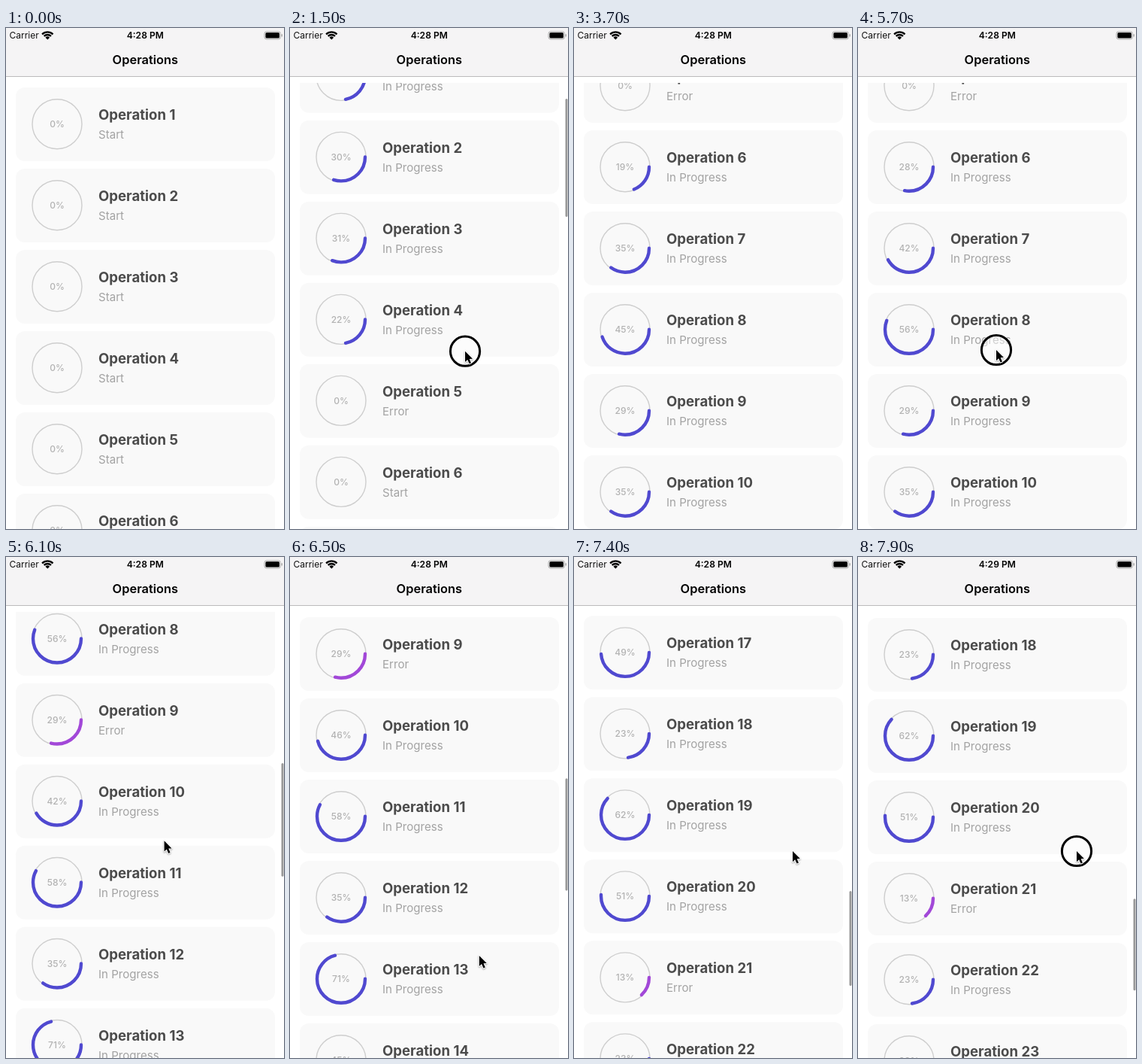
Recreate the animation shown at these times as an HTML page with a canvas. Size 370 by 666 pixels, loop 8 s.

```html
<!DOCTYPE html>
<html lang="en">
<head>
<meta charset="utf-8">
<title>Operations</title>
<style>
  html, body { margin: 0; width: 100%; height: 100%; overflow: hidden; background: #fff; }
  canvas { display: block; width: 370px; height: 666px; }
</style>
</head>
<body>
<canvas id="stage"></canvas>
<script>
const W = 370, H = 666, LOOP = 8000, STEP = 100;
const PITCH = 108, FIRST_TOP = 79, LIST_TOP = 73, VIEW = H - LIST_TOP;
const BLUE = '#5049d0', PURPLE = '#a248d8';
const TAU = Math.PI * 2, DECAY = 2.87;

const canvas = document.getElementById('stage');
const dpr = window.devicePixelRatio || 1;
canvas.width = W * dpr;
canvas.height = H * dpr;
const ctx = canvas.getContext('2d');
ctx.scale(dpr, dpr);

const ramp = (t, from, to) => Math.min(1, Math.max(0, (t - from) / (to - from)));
const mix = (a, b, u) => a + (b - a) * u;
const pull = u => u ** 1.6;
const coast = u => (1 - Math.exp(-DECAY * u)) / (1 - Math.exp(-DECAY));

// Each touch drags the list from (x, y) to (endX, y - drag), then coasts to a stop.
const flicks = [
  { down: 1300, up: 1600, rest: 2200, x: 232, endX: 234, y: 494, drag: 123, stop: 483 },
  { down: 5700, up: 5900, rest: 6500, x: 184, endX: 190, y: 428, drag: 127, stop: 863 },
  { down: 6550, up: 6800, rest: 7800, x: 257, endX: 291, y: 549, drag: 158, stop: 1834 },
  { down: 7800, up: LOOP, rest: LOOP, x: 291, endX: 291, y: 391, drag: 0, stop: 1834 }
];

function scrollAt(t) {
  let scroll = 0;
  for (const { down, up, rest, drag, stop } of flicks) {
    if (t < down) break;
    const released = scroll + drag;
    scroll = t < up
      ? mix(scroll, released, pull(ramp(t, down, up)))
      : mix(released, stop, coast(ramp(t, up, rest)));
  }
  return scroll;
}

const waypoints = [
  { t: 1000, x: 279, y: 519 },
  { t: 2500, x: 241, y: 372 },
  { t: 2700, x: 298, y: 375 },
  { t: 3300, x: 298, y: 375 },
  { t: 5200, x: 290, y: 520 },
  ...flicks.flatMap(f => [
    { t: f.down, x: f.x, y: f.y, ease: pull },
    { t: f.up, x: f.endX, y: f.y - f.drag }
  ])
].sort((a, b) => a.t - b.t);

function pointerAt(t) {
  if (t < 1000 || (t >= 3300 && t < 5200)) return null;
  const next = waypoints.findIndex(p => p.t > t);
  const a = waypoints[next - 1], b = waypoints[next];
  const linear = ramp(t, a.t, b.t), u = a.ease ? a.ease(linear) : linear;
  return { x: mix(a.x, b.x, u), y: mix(a.y, b.y, u) };
}

const goals = [
  22, 30, 31, 22, 0, 28, 42, 56, 29, 46, 58, 35,
  71, 45, 6, 55, 49, 23, 62, 51, 13, 23, 28
];
const lateGain = { 6: 9, 7: 7, 8: 11, 10: 11 };
const failing = [5, 9, 15, 21];

function stateOf(n, t) {
  const early = n <= 5, middle = n <= 8;
  const started = t >= (early ? 100 : 1700);
  const failed = failing.includes(n) && t >= (early ? 100 : 6000);
  const growth = early ? ramp(t, 400, 1300) : middle ? ramp(t, 1700, 2400) : ramp(t, 3100, 3700);
  const lateStart = middle ? 4100 : 5800;
  const pending = (lateGain[n] || 0) * (1 - ramp(t, lateStart, lateStart + 500));
  return {
    percent: (goals[n - 1] - pending) * growth,
    failed,
    label: failed ? 'Error' : started ? 'In Progress' : 'Start'
  };
}

function text(str, x, y, size, weight, color, align = 'left') {
  ctx.font = `${weight} ${size}px Inter, sans-serif`;
  ctx.fillStyle = color;
  ctx.textAlign = align;
  ctx.fillText(str, x, y);
}

function roundRect(x, y, w, h, r, color) {
  ctx.beginPath();
  ctx.roundRect(x, y, w, h, r);
  ctx.fillStyle = color;
  ctx.fill();
}

function arc(x, y, r, from, to, width, color) {
  ctx.beginPath();
  ctx.arc(x, y, r, from, to);
  ctx.lineWidth = width;
  ctx.strokeStyle = color;
  ctx.stroke();
}

function drawCard(n, top, t) {
  const { percent, failed, label } = stateOf(n, t);
  const cx = 68, cy = top + 48.7;
  roundRect(13, top, 345, 98, 12, '#f9f9f9');
  arc(cx, cy, 33, 0, TAU, 1.4, '#cecece');
  if (percent >= 0.5) {
    ctx.lineCap = 'round';
    arc(cx, cy, 32, 0, TAU * percent / 100, 4.4, failed ? PURPLE : BLUE);
  }
  text(Math.round(percent) + '%', cx, cy + 4.4, 12, 500, '#b2b2b2', 'center');
  text('Operation ' + n, 123, top + 42.8, 18.6, 700, '#4b4b4b');
  text(label, 123, top + 68, 15.1, 400, '#a3a3a3');
}

function drawList(t, scroll) {
  ctx.save();
  ctx.beginPath();
  ctx.rect(0, LIST_TOP, W, VIEW);
  ctx.clip();
  goals.forEach((_, i) => {
    const top = FIRST_TOP + i * PITCH - scroll;
    if (top > -PITCH && top < H) drawCard(i + 1, top, t);
  });
  ctx.restore();
}

function drawScrollbar(t, scroll) {
  const alpha = Math.max(...flicks.map(({ down, rest }) =>
    t > down ? 1 - ramp(t, rest + 1000, rest + 1300) : 0));
  const length = 157 - 35 * (scroll / 1834) ** 2;
  ctx.globalAlpha = alpha;
  roundRect(366.5, LIST_TOP + 4 + scroll * length / VIEW, 3, length, 1.5, '#999');
  ctx.globalAlpha = 1;
}

function drawWifi(x, y) {
  const left = -TAU * 3 / 8, right = -TAU / 8;
  ctx.lineCap = 'butt';
  for (const r of [10.2, 6.6]) arc(x, y, r, left, right, 2.3, '#000');
  ctx.beginPath();
  ctx.moveTo(x, y);
  ctx.arc(x, y, 4, left, right);
  ctx.fillStyle = '#000';
  ctx.fill();
}

function drawHeader(t) {
  ctx.fillStyle = '#f5f4f5';
  ctx.fillRect(0, 0, W, 64);
  ctx.fillStyle = '#bcbbbc';
  ctx.fillRect(0, 64, W, 1);
  text('Carrier', 4.5, 14.3, 12, 400, '#111');
  drawWifi(55.3, 15.6);
  text(t < 7500 ? '4:28 PM' : '4:29 PM', 185.3, 14.3, 12.1, 600, '#000', 'center');
  ctx.beginPath();
  ctx.roundRect(344, 4.7, 21.4, 10.2, 2.8);
  ctx.lineWidth = 1;
  ctx.strokeStyle = '#aaa';
  ctx.stroke();
  roundRect(345.4, 6.1, 18.6, 7.4, 1.6, '#000');
  roundRect(366.5, 8, 1.4, 3.6, 0.7, '#aaa');
  text('Operations', 185.3, 47.8, 16.4, 600, '#000', 'center');
}

function drawPointer(t) {
  const at = pointerAt(t);
  if (!at) return;
  if (flicks.some(f => t >= f.down && t <= f.up)) {
    ctx.beginPath();
    ctx.arc(at.x, at.y, 19.6, 0, TAU);
    ctx.fillStyle = 'rgba(255,255,255,.5)';
    ctx.fill();
    ctx.lineWidth = 3;
    ctx.strokeStyle = '#000';
    ctx.stroke();
  }
  ctx.save();
  ctx.translate(at.x, at.y);
  ctx.beginPath();
  [[0, 0], [0, 14.2], [3.2, 11.2], [5.6, 16.6], [8, 15.5], [5.7, 10.3], [10, 10.1]]
    .forEach(([x, y]) => ctx.lineTo(x, y));
  ctx.closePath();
  ctx.lineJoin = 'round';
  ctx.lineWidth = 2;
  ctx.strokeStyle = '#fff';
  ctx.shadowColor = 'rgba(0,0,0,.35)';
  ctx.shadowBlur = 2 * dpr;
  ctx.shadowOffsetY = dpr;
  ctx.stroke();
  ctx.shadowColor = 'transparent';
  ctx.fillStyle = '#000';
  ctx.fill();
  ctx.restore();
}

function draw(now) {
  const t = Math.floor((now % LOOP) / STEP) * STEP;
  const scroll = scrollAt(t);
  ctx.fillStyle = '#fff';
  ctx.fillRect(0, 0, W, H);
  drawList(t, scroll);
  drawHeader(t);
  drawScrollbar(t, scroll);
  drawPointer(t);
}

const start = performance.now();
function loop() {
  draw(performance.now() - start);
  requestAnimationFrame(loop);
}
loop();
</script>
</body>
</html>
```
